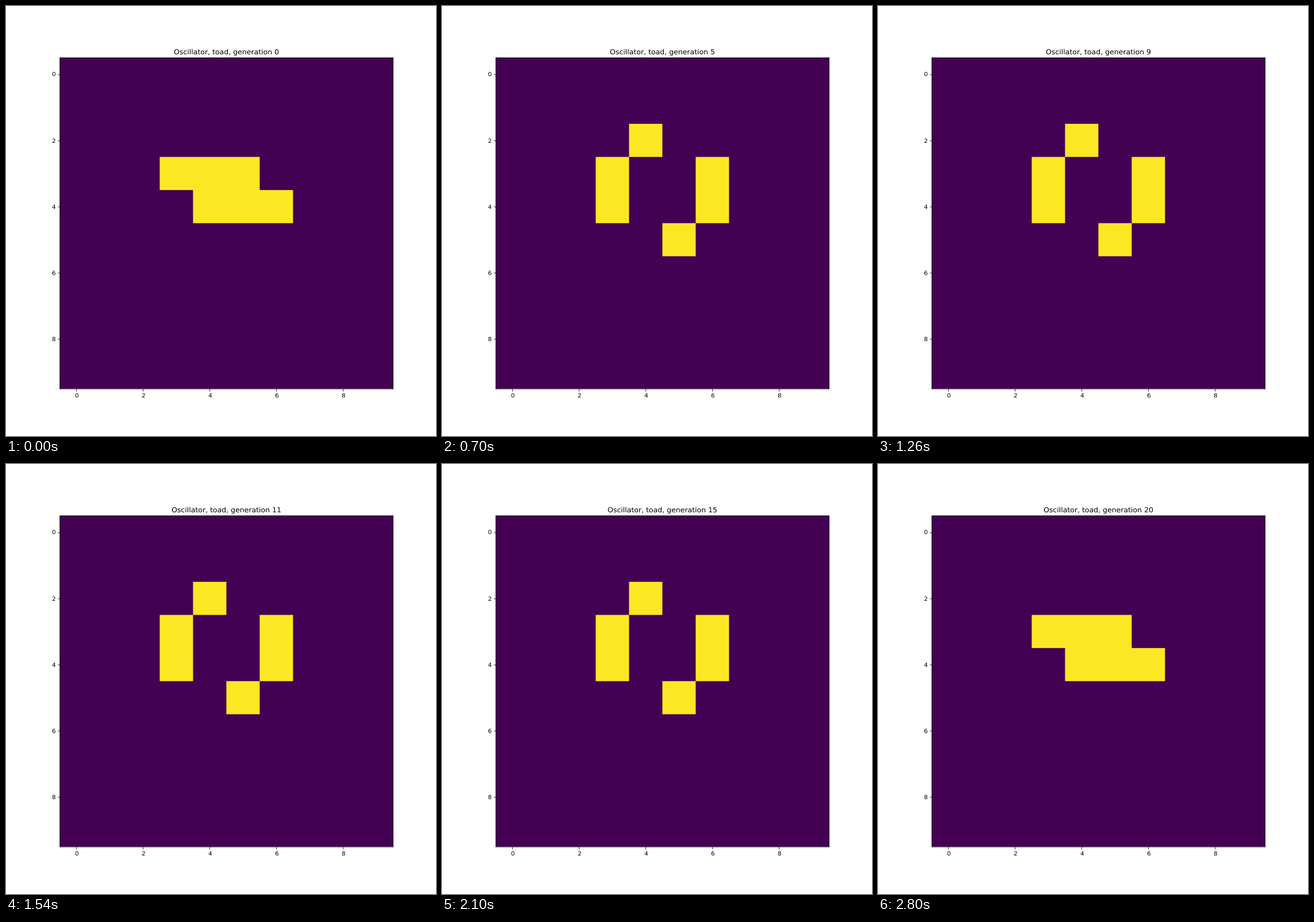
Recreate the animation shown at these times as a matplotlib script. Size 748x748 px, loop 2940 ms.

```python
import numpy as np
import matplotlib.pyplot as plt
from matplotlib.animation import FuncAnimation
from matplotlib.patches import PathPatch
from matplotlib.path import Path
from matplotlib.transforms import ScaledTranslation

INCHES, DPI = 10, 74.8
CELLS = 10
GENERATIONS, STEP_MS = 21, 140
DEAD, ALIVE = plt.get_cmap("viridis")([0.0, 1.0])

plt.rcParams.update({"font.family": "DejaVu Sans", "text.hinting": "none"})


def step(grid):
    """Advance the cellular automaton by one generation."""
    shifts = [(dy, dx) for dy in (-1, 0, 1) for dx in (-1, 0, 1) if dy or dx]
    around = sum(np.roll(grid, s, axis=(0, 1)) for s in shifts)
    return ((around == 3) | ((grid == 1) & (around == 2))).astype(int)


def evolve(grid, count):
    states = [grid]
    while len(states) < count:
        states.append(step(states[-1]))
    return states


def outline(grid):
    """Join all live cells into one path, so shared edges leave no seam."""
    unit = Path.unit_rectangle()
    squares = [Path(unit.vertices + (x - 0.5, y - 0.5), unit.codes)
               for y, x in np.argwhere(grid)]
    return Path.make_compound_path(*squares)


toad = np.zeros((CELLS, CELLS), dtype=int)
toad[3, 3:6] = 1
toad[4, 4:7] = 1
shapes = [outline(grid) for grid in evolve(toad, GENERATIONS)]

fig, ax = plt.subplots(figsize=(INCHES, INCHES), dpi=DPI)
ax.set(xlim=(-0.5, CELLS - 0.5), ylim=(CELLS - 0.5, -0.5), facecolor=DEAD)
ax.patch.set_snap(False)

# Unsnapped frame lines, centred slightly right of and below the edges
nudge = ScaledTranslation(0.005, -0.005, fig.dpi_scale_trans)
for spine in ax.spines.values():
    spine.set_transform(spine.get_spine_transform() + nudge)
    spine.set_snap(False)

cells = ax.add_patch(PathPatch(shapes[0], facecolor=ALIVE, linewidth=0,
                               edgecolor="none", snap=False))
title = ax.set_title("")


def update(n):
    cells.set_path(shapes[n])
    title.set_text(f"Oscillator, toad, generation {n}")
    return cells, title


anim = FuncAnimation(fig, update, frames=GENERATIONS, interval=STEP_MS,
                     repeat=True, repeat_delay=0, blit=False)
plt.show()
```
